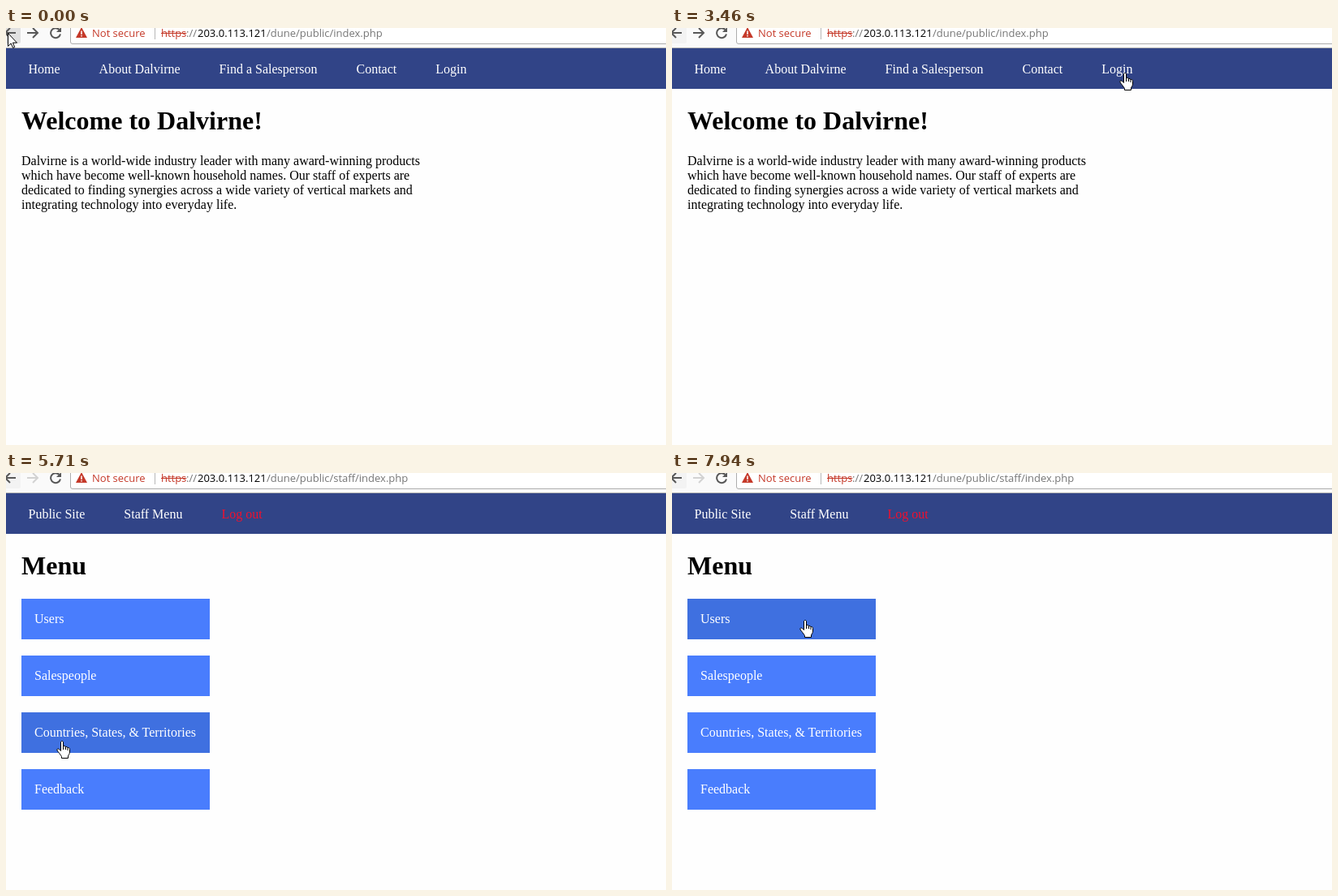
An HTML page that plays this animation: 813 by 514 pixels, repeating every 8000 ms.

```html
<!DOCTYPE html>
<html lang="en">
<head>
<meta charset="utf-8">
<title>Staff site tour</title>
<style>
  html, body { margin: 0; width: 100%; height: 100%; overflow: hidden; background: #fefefe; }
  body { position: relative; font: 16px/18px "Liberation Serif", "Times New Roman", serif; color: #000; }
  [hidden] { display: none !important; }

  .bar { position: absolute; inset: 0 0 auto; height: 24px; background: #fafafa; border-bottom: 1px solid #b4b4b4;
    overflow: hidden; font: 13px/18px "Open Sans", "Noto Sans", sans-serif; white-space: pre; }
  .bar > * { position: absolute; }
  .bar span { top: -3px; }
  .box { left: 79px; top: -10px; right: -10px; height: 28px; background: #fff; border: 1px solid #adadad; border-radius: 3px; }
  .back { left: 0; top: 0; width: 18px; height: 19px; background: #f3f3f3; border-radius: 0 0 2px 0; }
  .back.hover { background: #e0e0e0; }
  .zone { left: 185px; top: 0; right: 0; height: 19px; }
  .icons { left: 0; top: 0; fill: none; stroke: #585858; stroke-width: 2; }
  .red { color: #c53929; }
  .grey { color: #767676; }

  .page { position: absolute; inset: 25px 0 0; }
  nav { display: flex; gap: 48px; align-items: center; box-sizing: border-box; height: 50px;
    padding: 2px 0 0 27.5px; background: #314487; color: #fff; white-space: nowrap; }
  .out { color: #f0102e; }
  h1 { position: absolute; left: 19px; top: 71px; margin: 0; font: bold 32px/37px "Liberation Serif", "Times New Roman", serif; white-space: nowrap; }
  p { position: absolute; left: 19px; top: 130px; margin: 0; white-space: nowrap; }
  .item { position: absolute; left: 19px; top: calc(130px + 70px * var(--i)); width: 200px; height: 18px;
    padding: 16px; background: #497dfd; color: #fff; white-space: nowrap; }
  .item { width: 200px; }
  .item.hover { background: #3f70e0; }

  #cursor { position: absolute; left: 0; top: 0; overflow: visible; pointer-events: none; }
  #cursor path { fill: #fff; stroke: #000; stroke-width: 1; }
  #cursor .text path { fill: none; stroke: #fff; }
</style>
</head>
<body>
<div class="bar">
  <div class="box"></div>
  <div class="back" id="back"></div>
  <svg class="icons" width="110" height="24">
    <path d="M12 6H0M5 0L-1 6L5 12"/>
    <path id="forward" d="M26 6H39M33 0L39 6L33 12"/>
    <g id="reload">
      <path d="M65.5 2A6 6 0 1 0 67 7.5"/>
      <path d="M68 -1V5H62Z" fill="#585858" stroke="none"/>
    </g>
    <path id="stop" d="M55.5 .5L66.5 11.5M66.5 .5L55.5 11.5"/>
    <path d="M93 -1L100 12H86Z" fill="#c53929" stroke="none"/>
    <path d="M93 3.5V8M93 9V10.5" stroke="#fff" stroke-width="1.5"/>
  </svg>
  <span class="red" style="left:106px">Not secure</span>
  <i style="left:183px;top:0;width:1px;height:14px;background:#b8b8b8"></i>
  <span class="red" style="left:191px;text-decoration:line-through">https</span>
  <span class="grey" style="left:222px">://</span>
  <span style="left:236px">203.0.113.121</span>
  <span class="grey" style="left:321px" id="path"></span>
  <div class="zone" data-cursor="text"></div>
</div>

<div class="page" id="home">
  <nav>
    <span data-cursor="hand">Home</span><span data-cursor="hand">About Dalvirne</span><span data-cursor="hand">Find a Salesperson</span><span data-cursor="hand">Contact</span><span data-cursor="hand">Login</span>
  </nav>
  <h1 data-cursor="text">Welcome to Dalvirne!</h1>
  <p data-cursor="text">Dalvirne is a world-wide industry leader with many award-winning products<br>which have become well-known household names. Our staff of experts are<br>dedicated to finding synergies across a wide variety of vertical markets and<br>integrating technology into everyday life.</p>
</div>

<div class="page" id="staff" hidden>
  <nav>
    <span data-cursor="hand">Public Site</span><span data-cursor="hand">Staff Menu</span><span data-cursor="hand" class="out">Log out</span>
  </nav>
  <h1 data-cursor="text">Menu</h1>
  <div class="item" style="--i:0" data-cursor="hand">Users</div>
  <div class="item" style="--i:1" data-cursor="hand">Salespeople</div>
  <div class="item" style="--i:2" data-cursor="hand">Countries, States, &amp; Territories</div>
  <div class="item" style="--i:3" data-cursor="hand">Feedback</div>
</div>

<svg id="cursor" width="1" height="1">
  <g class="arrow"><path d="M.5 .5V16.5L4.2 13L6.6 18.5L8.7 17.6L6.4 12.2H11.5Z"/></g>
  <g class="hand" transform="translate(-6 0)">
    <path d="M5.5 12.5V2C5.5 0 8.5 0 8.5 2V7C9 6 11.5 6.2 11.5 8C12 7 14 7.3 14 9C14.6 8 16.5 8.4 16.5 10.5V14C16.5 16 15 17.5 14.5 19V21.5H6.5V19.5C5 17 2.5 14 1 12C0 10.3 2.3 9.3 3.5 10.5Z"/>
    <path d="M8.5 7V11M11.5 8V11M14 9V12"/>
  </g>
  <g class="text"><path d="M-3 -7.5H0M1 -7.5H4M.5 -7V7M-3 7.5H0M1 7.5H4"/></g>
</svg>

<script>
const LOOP = 8000, STEP = 139.2, LEAD = 18;
const LOGIN = 25, LOADED = 32, LEAVE = 35;

// Pointer path: step, x, y
const path = [
  [0, 2, 6], [1, 20, 8], [3, 100, 9], [8, 277, 11], [12, 630, 12], [13, 600, 45],
  [16, 300, 103], [17, 175, 140], [19, 485, 157], [20, 582, 148], [21, 586, 118],
  [23, 566, 72], [24, 557, 55], [LOGIN, 554, 52], [LEAVE - 1, 554, 52],
  [35, 430, 55], [37, 100, 60], [38, 27, 60], [41, 68, 330], [42, 74, 406],
  [43, 76, 412], [47, 56, 118], [48, 110, 80], [50, 325, 57], [51, 347, 40],
  [52, 290, 23], [54, 110, 24], [55, 95, 70], [57, 163, 181]
];

const $ = id => document.getElementById(id);
const cursor = $("cursor");
const shapes = [...cursor.children];
const items = [...document.querySelectorAll(".item")];
const show = (el, on) => { el.style.display = on ? "" : "none"; };
const start = performance.now();
let last = -1;

function pointAt(step) {
  const i = path.findIndex(p => p[0] >= step);
  if (i < 0) return path[path.length - 1].slice(1);
  if (i === 0) return path[0].slice(1);
  const [s0, x0, y0] = path[i - 1], [s1, x1, y1] = path[i];
  const k = (step - s0) / (s1 - s0);
  return [Math.round(x0 + (x1 - x0) * k), Math.round(y0 + (y1 - y0) * k)];
}

function draw(step) {
  const staff = step >= LOADED, loading = step === LOADED;
  $("home").hidden = staff;
  $("staff").hidden = !staff;
  $("path").textContent = staff ? "/dune/public/staff/index.php" : "/dune/public/index.php";
  $("forward").style.stroke = staff ? "#d2d2d2" : "";
  $("back").classList.toggle("hover", step === 0);
  show($("stop"), loading);
  show($("reload"), !loading);

  const [x, y] = pointAt(step);
  const hit = document.elementFromPoint(x, y);
  const target = hit && hit.closest("[data-cursor]");
  const held = step >= LOGIN && step < LEAVE;
  const kind = held ? "hand" : target ? target.dataset.cursor : "arrow";
  shapes.forEach(s => show(s, s.classList.contains(kind)));
  items.forEach(el => el.classList.toggle("hover", el === target));
  cursor.style.mixBlendMode = kind === "text" ? "difference" : "normal";
  cursor.style.transform = `translate(${x}px, ${y}px)`;
}

function tick() {
  const t = (performance.now() - start) % LOOP;
  const step = Math.min(57, Math.floor((t + LEAD) / STEP));
  if (step !== last) draw(last = step);
  requestAnimationFrame(tick);
}
tick();
</script>
</body>
</html>
```
